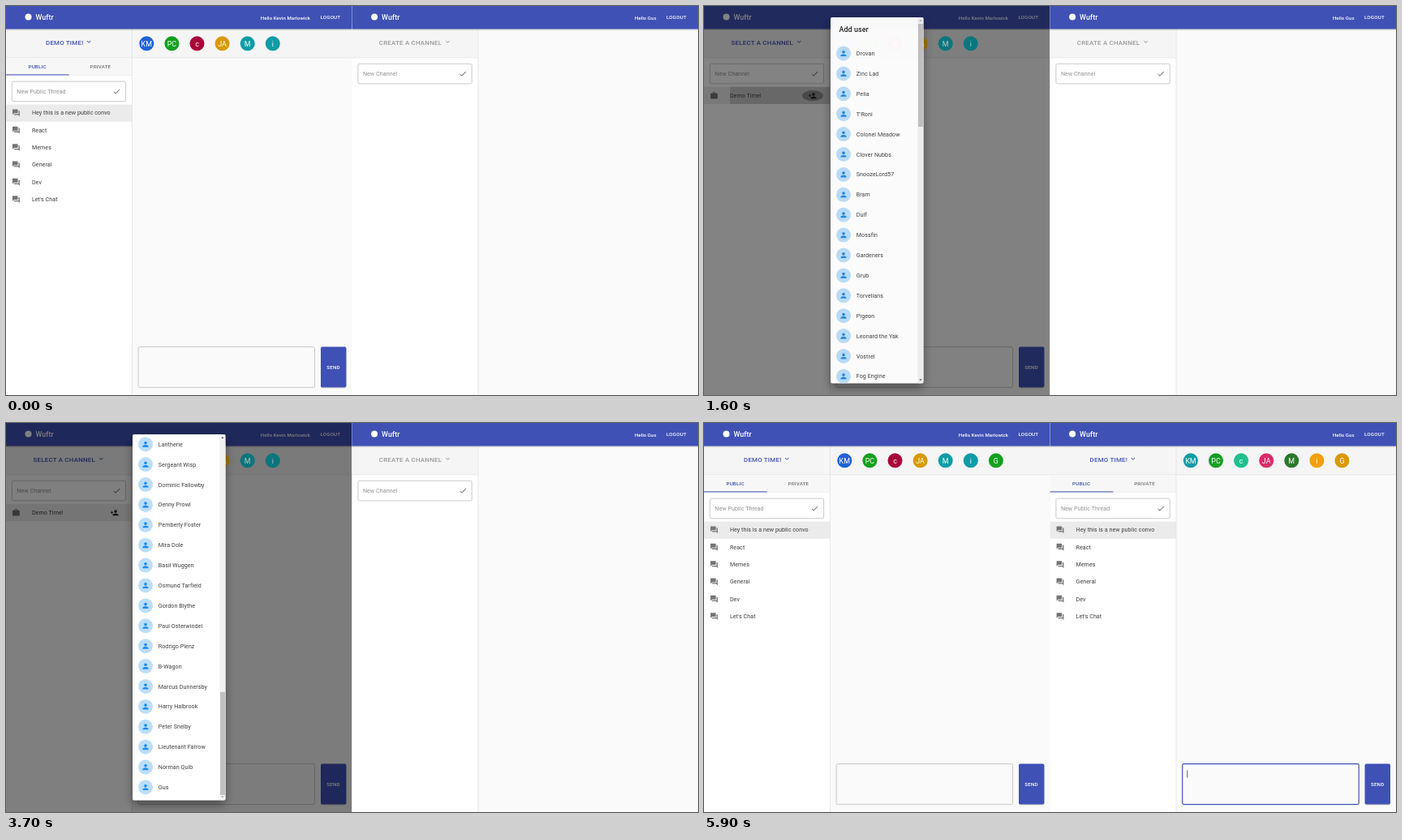
Animation of 853 by 480 pixels, one loop 6 s. Source, as an HTML page:

```html
<!DOCTYPE html>
<html lang="en">
<head>
<meta charset="utf-8">
<title>Chat demo</title>
<style>
html, body { margin: 0; height: 100%; overflow: hidden; background: #fafafa; }
svg { display: block; width: 100vw; height: 100vh; font-family: Roboto, Arial, sans-serif; }
</style>
</head>
<body>
<svg id="stage" viewBox="0 0 853 480"></svg>
<script>
const LOOP = 6000, STEP = 100, HALF = 426.6, UNIT = 0.4444;
const BLUE = '#3f51b5', INK = '#3c3c3c', HINT = '#8f8f8f';
const stage = document.getElementById('stage');

const ICONS = {
  forum: 'M21 6h-2v9H6v2c0 .55.45 1 1 1h11l4 4V7c0-.55-.45-1-1-1zm-4 6V3c0-.55-.45-1-1-1H3c-.55 0-1 .45-1 1v14l4-4h10c.55 0 1-.45 1-1z',
  work: 'M20 6h-4V4c0-1.11-.89-2-2-2h-4c-1.11 0-2 .89-2 2v2H4c-1.11 0-2 .89-2 2v11c0 1.11.89 2 2 2h16c1.11 0 2-.89 2-2V8c0-1.11-.89-2-2-2zm-6 0h-4V4h4v2z',
  person: 'M12 12c2.21 0 4-1.79 4-4s-1.79-4-4-4-4 1.79-4 4 1.79 4 4 4zm0 2c-2.67 0-8 1.34-8 4v2h16v-2c0-2.66-5.33-4-8-4z',
  add: 'M15 12c2.21 0 4-1.79 4-4s-1.79-4-4-4-4 1.79-4 4 1.79 4 4 4zm-9-2V7H4v3H1v2h3v3h2v-3h3v-2H6zm9 4c-2.67 0-8 1.34-8 4v2h16v-2c0-2.66-5.33-4-8-4z',
  check: 'M9 16.17L4.83 12l-1.42 1.41L9 19 21 7l-1.41-1.41z',
  more: 'M16.59 8.59L12 13.17 7.41 8.59 6 10l6 6 6-6z'
};

const THREADS = ['Hey this is a new public convo', 'React', 'Memes', 'General', 'Dev', "Let's Chat"];
const INITIALS = ['KM', 'PC', 'c', 'JA', 'M', 'i', 'G'];
const LEFT_COLORS = ['#1f62d6', '#12a01f', '#a8083c', '#d89a00', '#0f9ca6', '#0f9ca6', '#12a01f'];
const RIGHT_COLORS = ['#0f9ca6', '#12a01f', '#1fc08e', '#dd2a68', '#2a7a2a', '#f0a010', '#d89a00'];
const USERS = `Drovan,Zinc Lad,Pelia,T'Roni,Colonel Meadow,Clover Nubbs,SnoozeLord57,Bram,Dulf,Mossfin,
Gardeners,Grub,Torvelians,Pigeon,Leonard the Yak,Vostrel,Fog Engine,Tammerin,Mister Pebble,Olwick,
Sunny Brell,Hobbin,Lady Thimble,Corvan,Quenby,Major Turnip,Ellora Finch,Wendrick,Puddle,Tarn,
Iggo Brasp,Fennimore,Aunt Sprocket,Jolveth,Rook Marden,Silla,Bramwen,Otto Klimp,
Nurse Peculiar,Tolm,Green Badger,Adeyu,Rusty,Lantherie,Sergeant Wisp,Dominic Fallowby,Denny Prowl,
Pemberly Foster,Mira Dole,Basil Wuggen,Osmund Tarfield,Gordon Blythe,Paul Osterwindel,Rodrigo Plenz,
B-Wagon,Marcus Dunnersby,Harry Halbrook,Peter Snelby,Lieutenant Farrow,Norman Quib,Gus`.split(/,\s*/);

const rect = (x, y, w, h, fill, more = '') =>
  `<rect x="${x}" y="${y}" width="${w}" height="${h}" fill="${fill}" ${more}/>`;
const circle = (x, y, r, fill) => `<circle cx="${x}" cy="${y}" r="${r}" fill="${fill}"/>`;
const text = (s, x, y, size, fill, weight = 400, anchor = 'start', gap = 0.009) =>
  `<text x="${x}" y="${y}" font-size="${size}" fill="${fill}" font-weight="${weight}" text-anchor="${anchor}" letter-spacing="${gap * size}">${s}</text>`;
const label = (s, x, y, size, fill, anchor) => text(s, x, y, size, fill, 500, anchor, 0.0286);
const icon = (name, cx, cy, fill, k = UNIT) =>
  `<path d="${ICONS[name]}" fill="${fill}" transform="translate(${cx - 12 * k} ${cy - 12 * k}) scale(${k})"/>`;
const ramp = (t, a, b) => Math.min(1, Math.max(0, (t - a) / (b - a)));

function avatars(colors, count) {
  return colors.slice(0, count).map((c, i) => {
    const x = 173.3 + 31.1 * i;
    return circle(x, 46.3, 9, c) + text(INITIALS[i], x, 49.5, 8.9, '#fff', 400, 'middle');
  }).join('');
}

function header(user) {
  return rect(0, 0, HALF, 28.4, BLUE) + circle(27.5, 13.5, 4, '#fff') +
    text('Wuftr', 36.5, 17.3, 8.9, '#fff', 500) +
    text('Hello ' + user, 375, 16.6, 6.05, '#fff', 500, 'end') +
    label('LOGOUT', 387.4, 16.2, 6.22, '#fff');
}

function titleBar(name, x, end, color) {
  return label(name, x, 48.3, 7.9, color) + icon('more', end + 6, 44.2, color, 0.4);
}

function field(hint, y) {
  return rect(7.3, y, 140.3, 24.6, '#fff', 'rx="1.8" stroke="#bdbdbd" stroke-width=".8"') +
    text(hint, 13.3, y + 14.5, 7.11, HINT) + icon('check', 136.5, y + 12.4, '#6b6b6b');
}

function threadList(selected) {
  let out = titleBar('DEMO TIME!', 49, 96.2, BLUE) +
    rect(0, 64, 155.3, 21.3, '#f7f7f7') + rect(0, 84.9, 155.3, 0.5, '#dcdcdc') +
    rect(0, 84.4, 77.7, 1, BLUE) +
    label('PUBLIC', 38.6, 76.6, 6.22, BLUE, 'middle') +
    label('PRIVATE', 116.4, 76.6, 6.22, '#757575', 'middle') +
    field('New Public Thread', 93.1);
  if (selected) out += rect(0, 121.6, 155.3, 21.2, '#ebebeb');
  THREADS.forEach((name, i) => {
    const y = 131.9 + 21.35 * i;
    out += icon('forum', 12.4, y, '#757575') + text(name, 31.9, y + 2.5, 7.11, INK);
  });
  return out;
}

function channelList(pressed) {
  let out = titleBar('SELECT A CHANNEL', 33.6, 111.3, BLUE) + field('New Channel', 71.3) +
    rect(0, 99.8, 155.3, 21.2, '#ebebeb') + icon('work', 12.4, 110.4, '#757575');
  if (pressed) out += rect(32, 99.8, 123.3, 21.2, '#000', 'opacity=".14"') +
    '<ellipse cx="134" cy="110.6" rx="13" ry="6.6" opacity=".3"/>';
  return out + text('Demo Time!', 31.9, 112.5, 7.11, INK) + icon('add', 133.7, 110.8, '#222');
}

function composer(focused, caret) {
  const line = focused ? `stroke="${BLUE}" stroke-width="1.2"` : 'stroke="#bdbdbd" stroke-width=".8"';
  return rect(163.1, 420.6, 217.5, 50, 'none', 'rx="1.8" ' + line) +
    (caret ? rect(168.9, 428.6, 0.7, 9, '#222') : '') +
    rect(388, 421.4, 31.4, 50, '#000', 'rx="1.8" opacity=".22"') +
    rect(388, 420.6, 31.4, 50, BLUE, 'rx="1.8"') +
    label('SEND', 403.6, 447.8, 6.22, '#fff', 'middle');
}

function pane(user, side, main, wide) {
  const barW = wide ? HALF : 155.3;
  return rect(0, 0, HALF, 480, '#fafafa') + rect(0, 28, 155.3, 452, '#fff') +
    rect(0, 28, barW, 36, '#f5f5f5') + rect(0, 63.6, barW, 0.6, '#dcdcdc') +
    side + rect(155.1, 28, 0.6, 452, '#dcdcdc') + main +
    rect(0, 28.4, HALF, 1.8, 'url(#fall)') + header(user);
}

// Indeterminate progress ring: starts as a dot at three o'clock.
function spinner(age) {
  const u = age / 1400, grow = ramp(u, 0, 0.5), e = grow * grow * (3 - 2 * grow);
  return `<circle cx="291" cy="238" r="8.1" fill="none" stroke="${BLUE}" stroke-width="1.4"
    stroke-dasharray="${0.4 + 40 * e} 90" stroke-dashoffset="${-6 * e}" transform="rotate(${360 * u} 291 238)"/>`;
}

function dialog(scroll) {
  let rows = text('Add user', 166.5, 31.6 - scroll, 8.9, '#222', 500);
  USERS.forEach((name, i) => {
    const y = 58.5 + 24.9 * i - scroll;
    if (y < 0 || y > 480) return;
    rows += circle(172, y, 9, '#bbdefb') + icon('person', 172, y, '#1e88e5') +
      text(name, 187.8, y + 2.5, 7.11, INK);
  });
  const arrow = (y, d, off) =>
    `<path d="M265.2 ${y}h3.4l-1.7 ${d}z" fill="${off ? '#a3a3a3' : '#505050'}"/>`;
  return rect(156, 14, 114.5, 451.5, '#fff', 'rx="1.8" filter="url(#lift)"') +
    `<g clip-path="url(#sheet)">${rows}` + rect(263.4, 14, 7.1, 451.5, '#f1f1f1') +
    rect(264, 22 + 310 * scroll / 1103, 6, 127, '#c1c1c1') +
    arrow(19, -2, scroll <= 0) + arrow(460.6, 2, scroll >= 1103) + '</g>';
}

const DEFS = `<defs>
  <linearGradient id="fall" x2="0" y2="1"><stop stop-opacity=".3"/><stop offset="1" stop-opacity="0"/></linearGradient>
  <filter id="lift" x="-30%" y="-10%" width="160%" height="120%"><feDropShadow dx="0" dy="5" stdDeviation="6" flood-opacity=".4"/></filter>
  <clipPath id="sheet"><rect x="156" y="14" width="114.5" height="451.5" rx="1.8"/></clipPath>
</defs>`;

function draw(t) {
  const choosing = t >= 800 && t < 3900;
  const fade = t < 3800 ? [0, 0.55, 0.97, 1][Math.min(3, Math.max(0, (t - 1400) / STEP))] : t < 3900 ? 0.4 : 0;
  const scroll = 978.5 * ramp(t, 1700, 2950) + 124.5 * ramp(t, 3200, 3500);
  const joined = t >= 4700, loaded = t >= 5100;
  const caret = joined && (t - 4700) % 1000 < 500;

  const left = pane('Kevin Marlowick', choosing ? channelList(t === 1500 || t === 1600) : threadList(true), composer(), true);
  const people = avatars(LEFT_COLORS, loaded ? 7 : 6);
  const right = joined
    ? pane('Gus', threadList(loaded),
        composer(true, caret) + (loaded ? avatars(RIGHT_COLORS, 7) : spinner(t - 4700)), true)
    : pane('Gus', titleBar('CREATE A CHANNEL', 33.2, 111.9, '#9a9a9a') + field('New Channel', 71.3), '', false);

  const veil = fade ? rect(0, 0, HALF, 480, '#000', `opacity="${0.5 * fade}"`) : '';
  const modal = fade ? `<g opacity="${fade}">${dialog(scroll)}</g>` : '';
  stage.innerHTML = DEFS + left + veil +
    `<g style="filter:brightness(${1 - 0.25 * fade})">${people}</g>` + modal +
    `<g transform="translate(${HALF})">${right}</g>`;
}

let shown = -1;
const start = performance.now();
function tick(now) {
  const t = Math.floor(Math.max(0, now - start) % LOOP / STEP) * STEP;
  if (t !== shown) draw(shown = t);
  requestAnimationFrame(tick);
}
tick(start);
</script>
</body>
</html>
```
